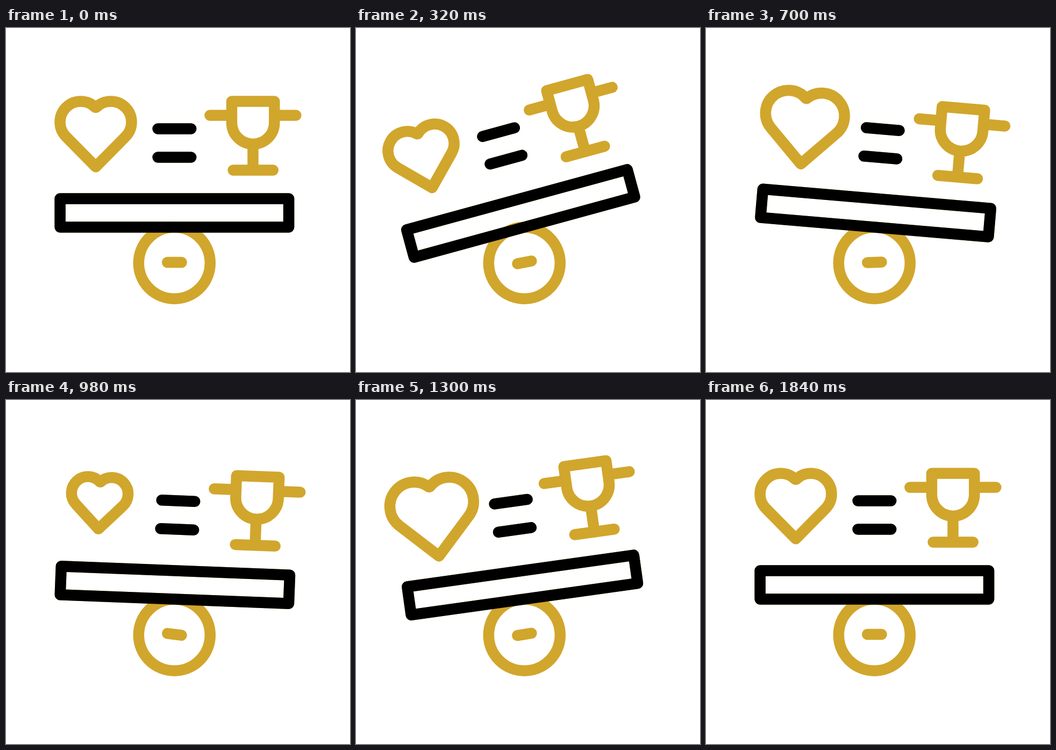
These frames come from a looping animation (640 px wide and 640 px high, 2400 ms). An HTML page with a canvas:

```html
<!DOCTYPE html>
<html lang="en">
<head>
<meta charset="utf-8">
<title>Balance</title>
<style>
  html, body { margin: 0; width: 100%; height: 100%; overflow: hidden; background: #fff; }
  canvas { display: block; width: 640px; height: 640px; }
</style>
</head>
<body>
<canvas id="stage" width="640" height="640"></canvas>
<script>
const canvas = document.getElementById('stage');
const ctx = canvas.getContext('2d');
const ratio = window.devicePixelRatio || 1;
canvas.width = canvas.height = 640 * ratio;

const GOLD = '#d1a62c';
const BLACK = '#000';
const LOOP = 2400;
const STEP = 20;
const LAG = 80;
const PIVOT = [313.3, 370.5];
const HUB = [313.3, 436];

// [time in ms, value]
const TILT = [[0, 0], [396, -16.9], [811, 9.5], [1205, -9], [1650, 0]];
const BEAT = [[240, 1], [500, 0.733], [768, 1.177], [1043, 0.733],
              [1308, 1.177], [1575, 0.733], [1840, 1]];

function valueAt(keys, t) {
  if (t <= keys[0][0]) return keys[0][1];
  for (let i = 1; i < keys.length; i++) {
    const [t0, a] = keys[i - 1], [t1, b] = keys[i];
    if (t < t1) {
      const u = (t - t0) / (t1 - t0);
      return a + (b - a) * u * u * (3 - 2 * u);
    }
  }
  return keys[keys.length - 1][1];
}

function stroke(color) {
  ctx.strokeStyle = color;
  ctx.stroke();
}

// black parts keep a faint gold rim from the layer below
function strokeBlack() {
  stroke(GOLD);
  stroke(BLACK);
}

function addLine(x0, y0, x1, y1) {
  ctx.moveTo(x0, y0);
  ctx.lineTo(x1, y1);
}

function turned([x, y], degrees, paint) {
  ctx.save();
  ctx.translate(x, y);
  ctx.rotate(degrees * Math.PI / 180);
  ctx.translate(-x, -y);
  paint();
  ctx.restore();
}

function drawHub(angle) {
  ctx.beginPath();
  ctx.arc(313.3, 437.2, 66.5, 0, Math.PI * 2);
  stroke(GOLD);
  turned(HUB, angle, () => {
    ctx.beginPath();
    addLine(300.2, 436, 326.6, 436);
    stroke(GOLD);
  });
}

// scales the outline only, the line weight stays
function drawHeart(s) {
  const cx = 167, cy = 196.3, q = Math.PI / 4;
  const y = cy + (175 - cy) * s, r = 38.5 * s;
  ctx.beginPath();
  ctx.arc(cx - 28 * s, y, r, 3 * q, 7 * q);
  ctx.arc(cx + 28 * s, y, r, 5 * q, 9 * q);
  ctx.lineTo(cx, cy + (258.3 - cy) * s);
  ctx.closePath();
  stroke(GOLD);
}

function drawTrophy() {
  ctx.beginPath();
  ctx.moveTo(420, 136.4);
  ctx.lineTo(499.3, 136.4);
  ctx.lineTo(499.3, 176.3);
  ctx.arc(459.65, 176.3, 39.65, 0, Math.PI);
  ctx.closePath();
  addLine(379.4, 162.6, 420, 162.6);
  addLine(499.3, 162.6, 539.4, 162.6);
  addLine(459.5, 216, 459.5, 264.6);
  addLine(422.6, 264.6, 496.8, 264.6);
  stroke(GOLD);
}

function drawEquals() {
  ctx.beginPath();
  for (const y of [187.4, 240.4]) addLine(282.6, y, 344.2, y);
  strokeBlack();
}

function drawPlank() {
  ctx.beginPath();
  ctx.rect(100.6, 317.5, 425.5, 53);
  strokeBlack();
}

function draw(t) {
  ctx.setTransform(ratio, 0, 0, ratio, 0, 0);
  ctx.fillStyle = '#fff';
  ctx.fillRect(0, 0, 640, 640);
  ctx.lineWidth = 20.5;
  ctx.lineCap = ctx.lineJoin = 'round';

  drawHub(valueAt(TILT, t - LAG));
  turned(PIVOT, valueAt(TILT, t), () => {
    drawHeart(valueAt(BEAT, t));
    drawTrophy();
    drawEquals();
    drawPlank();
  });
}

function tick() {
  const t = performance.now() % LOOP;
  draw(Math.floor(t / STEP) * STEP);
  requestAnimationFrame(tick);
}
tick();
</script>
</body>
</html>
```
